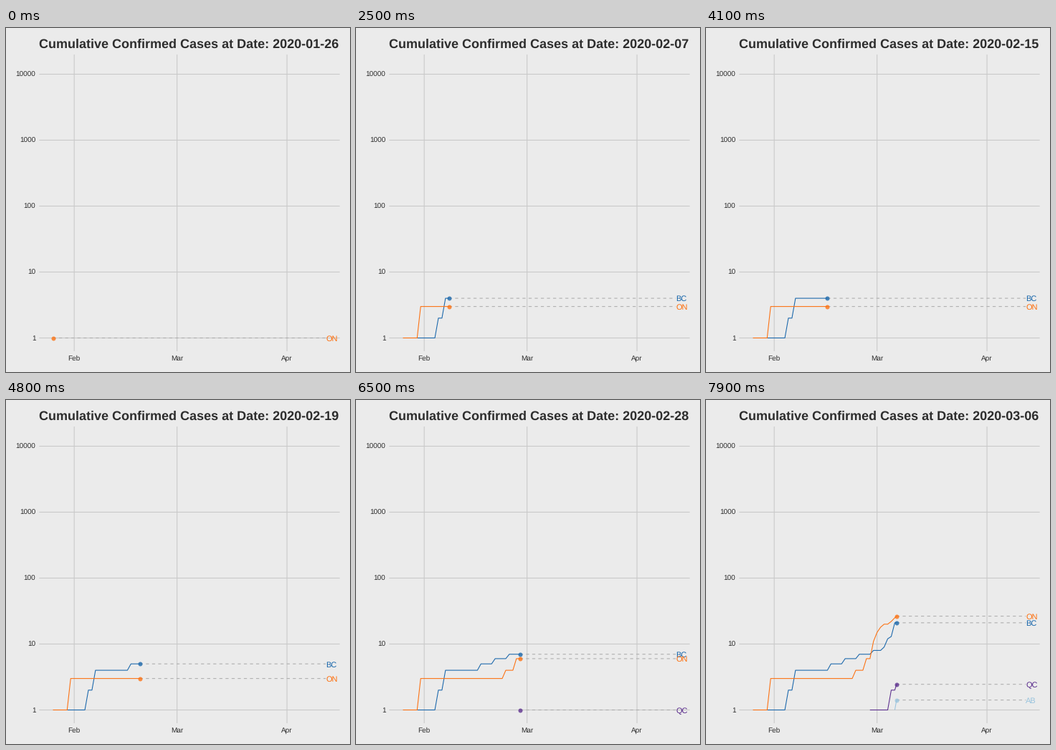
Write a matplotlib script that moves like this. It is 480x480 px and loops after 8000 ms.

```python
import matplotlib.pyplot as plt
import numpy as np
from matplotlib.animation import FuncAnimation

plt.rcParams.update({
    "font.family": "Liberation Sans",
    "text.hinting": "none",
    "text.hinting_factor": 1,
    "lines.scale_dashes": False,
})

SIZE, DPI = 480, 72          # at 72 dpi one point is one pixel
FRAMES, INTERVAL = 80, 100
START = np.datetime64("2020-01-26")
FRAMES_PER_DAY = 1.958
X0, DAY_W = 65.5, 4.948
Y1, DECADE = 432.5, 92
LEFT, RIGHT, TOP, BOTTOM = 46.3, 465.7, 37, 451
LABEL_X = 446.2
BG, GRID, INK, DASH = "#ebebeb", "#c9c9c9", "#2d2d2d", "#adadad"

# Province: colour, then (day, cumulative cases) at each bend of the curve
CURVES = {
    "AB": ("#99c4de", [(40, 1), (41, 2)]),
    "BC": ("#1866ab", [(4, 1), (9, 1), (10, 2), (11, 2), (12, 4), (21, 4),
                       (22, 5), (25, 5), (26, 6), (29, 6), (30, 7), (33, 7),
                       (34, 8), (36, 8), (37, 9), (38, 12), (39, 13),
                       (40, 21), (41, 21)]),
    "ON": ("#fd700f", [(0, 1), (4, 1), (5, 3), (28, 3), (29, 4), (31, 4),
                       (32, 6), (33, 6), (34, 11), (35, 15), (36, 18),
                       (37, 20), (38, 20), (39, 22), (40, 25), (41, 28)]),
    "QC": ("#5b2d8d", [(33, 1), (38, 1), (39, 2), (40, 2), (41, 3)]),
}


def x_at(day):
    return X0 + DAY_W * np.asarray(day)


def y_at(cases):
    return Y1 - DECADE * np.log10(cases)


fig = plt.figure(figsize=(SIZE / DPI, SIZE / DPI), dpi=DPI, facecolor=BG)
ax = fig.add_axes([0, 0, 1, 1])
ax.set(xlim=(0, SIZE), ylim=(SIZE, 0))
ax.axis("off")


def line(xs=(), ys=(), **style):
    return ax.plot(xs, ys, snap=False, **style)[0]


for power in range(5):
    y = y_at(10 ** power)
    line([LEFT, RIGHT], [y, y], color=GRID, lw=1.07, zorder=1,
         solid_capstyle="butt")
    ax.text(41.4, y + 3.4, str(10 ** power), size=9.6, color=INK,
            ha="right", va="baseline")

for name, first_day in (("Feb", 6), ("Mar", 35), ("Apr", 66)):
    x = x_at(first_day)
    line([x, x], [TOP, BOTTOM], color=GRID, lw=1.07, zorder=1,
         solid_capstyle="butt")
    ax.text(x, 464.3, name, size=9.6, color=INK, ha="center", va="baseline")

title = ax.text(45.9, 28, "", size=18, weight="bold", color=INK,
                va="baseline")


class Curve:
    def __init__(self, name, color, points):
        self.days, cases = np.array(points).T
        self.xs, self.ys = x_at(self.days), y_at(cases)
        self.dash = line(color=DASH, lw=1.07, zorder=2,
                         dashes=(4.27, 4.27), dash_capstyle="butt")
        self.path = line(color=color, lw=1.07, zorder=3,
                         solid_capstyle="butt", solid_joinstyle="round")
        self.dot = line(color=color, marker="o", ms=6, mew=0, alpha=0.78,
                        zorder=4)
        self.label = ax.text(LABEL_X, 0, name, size=11, color=color,
                             va="baseline", zorder=5)
        self.parts = [self.dash, self.path, self.dot, self.label]

    def show(self, day):
        active = bool(day >= self.days[0])
        for part in self.parts:
            part.set_visible(active)
        if not active:
            return
        past = self.days < day
        x, y = x_at(day), np.interp(day, self.days, self.ys)
        self.path.set_data(np.append(self.xs[past], x),
                           np.append(self.ys[past], y))
        self.dash.set_data([x, LABEL_X], [y, y])
        self.dot.set_data([x], [y])
        self.label.set_y(y + 4.2)


curves = [Curve(name, *spec) for name, spec in CURVES.items()]

# Each day lands on a whole frame; frames in between are interpolated
all_days = np.arange(42)
day_frames = np.rint(all_days * FRAMES_PER_DAY)


def update(frame):
    day = np.interp(frame, day_frames, all_days)
    today = START + int(frame / FRAMES_PER_DAY)
    title.set_text(f"Cumulative Confirmed Cases at Date: {today}")
    for curve in curves:
        curve.show(day)
    return []


anim = FuncAnimation(fig, update, frames=FRAMES, interval=INTERVAL,
                     init_func=lambda: update(0), repeat=True, repeat_delay=0)
plt.show()
```
